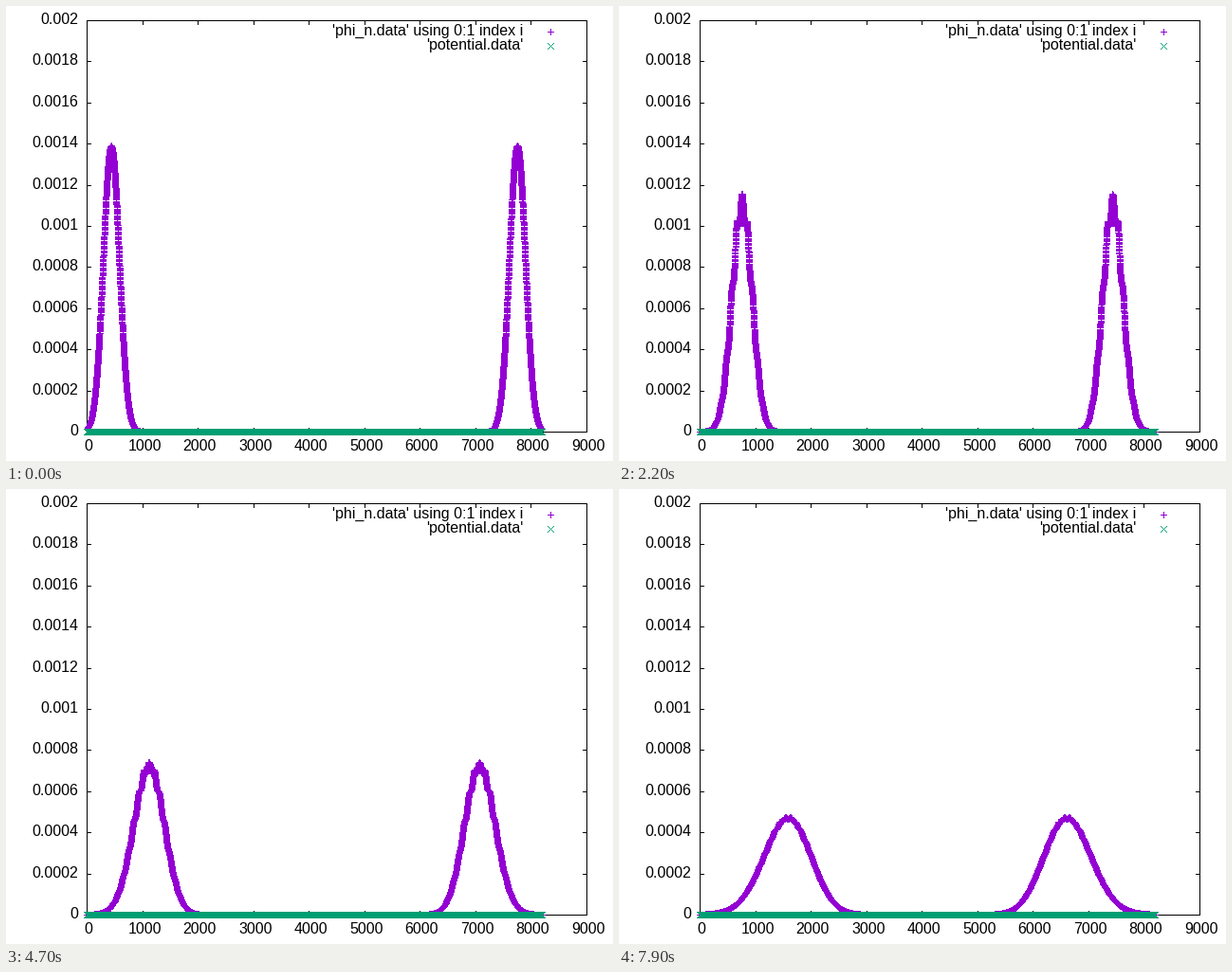
Animation of 640x480 px, one loop 8000 ms. Source, as a matplotlib script:

```python
import numpy as np
import matplotlib.pyplot as plt
from matplotlib.animation import FuncAnimation

W, H, DPI = 640, 480, 100
FRAMES, STEP = 80, 100
LEFT, RIGHT, TOP, BOTTOM = 85, 612, 15, 449
XMAX, YMAX, N = 9000, 0.002, 8192
PURPLE, GREEN = "#9400d3", "#009e73"
PX = 72 / DPI
ARM = 3

plt.rcParams["path.simplify"] = False
plt.rcParams["font.family"] = "Liberation Sans"

fig = plt.figure(figsize=(W / DPI, H / DPI), dpi=DPI, facecolor="white")
ax = fig.add_axes([0, 0, 1, 1])
ax.set(xlim=(0, W), ylim=(H, 0))
ax.axis("off")


def col(x):
    return np.rint(LEFT + np.asarray(x) * (RIGHT - LEFT) / XMAX)


def row(y):
    return np.rint(BOTTOM - np.asarray(y) * (BOTTOM - TOP) / YMAX)


def join(x0, y0, x1, y1):
    """Separate segments as one broken polyline."""
    gap = np.full(len(x0), np.nan)
    return (np.column_stack([x0, x1, gap]).ravel(),
            np.column_stack([y0, y1, gap]).ravel())


def pluses(c, r):
    return join(np.r_[c - ARM, c + 0.5], np.r_[r + 0.5, r - ARM],
                np.r_[c + ARM + 1, c + 0.5], np.r_[r + 0.5, r + ARM + 1])


def crosses(c, r):
    k = np.arange(-ARM, ARM + 1)
    x = np.add.outer(c, np.r_[k, k]).ravel()
    y = np.add.outer(r, np.r_[k, -k]).ravel()
    x, y = np.unique(np.column_stack([x, y]), axis=0).T
    return join(x, y + 0.5, x + 1, y + 0.5)


def stroke(xy, color, z):
    line, = ax.plot(*xy, color=color, lw=PX, antialiased=False, snap=False,
                    solid_capstyle="butt", zorder=z)
    return line


def label(x, y, s, ha):
    ax.text(x, y, s, ha=ha, va="baseline", fontsize=16 * PX, color="black")


def draw_frame():
    xs, ys = col(np.arange(0, XMAX + 1, 1000)), row(np.arange(11) * YMAX / 10)
    for y in (TOP, BOTTOM):
        stroke(([LEFT, RIGHT + 1], [y + 0.5] * 2), "black", 1)
    for x in (LEFT, RIGHT):
        stroke(([x + 0.5] * 2, [TOP, BOTTOM + 1]), "black", 1)
    for i, x in enumerate(xs):
        for y in (TOP, BOTTOM - 4):
            stroke(([x + 0.5] * 2, [y, y + 5]), "black", 1)
        label(x + 2, 469, str(i * 1000), "center")
    for i, y in enumerate(ys):
        for x in (LEFT, RIGHT - 4):
            stroke(([x, x + 5], [y + 0.5] * 2), "black", 1)
        label(76, y + 4, f"{i * 0.0002:.4g}", "right")


def packet(x, t):
    """Density of one spreading pulse that leaves the wall at x = 0."""
    d = x - 440 - 145 * t
    sigma = np.sqrt(143.5 ** 2 + 2540 * t ** 2)
    u = d / sigma
    u = u * (1 + 0.0025 * t * np.clip(u, -4, 4))
    base = 0.5 / (sigma * np.sqrt(2 * np.pi)) * np.exp(-u ** 2 / 2)
    early = np.exp(-2 * (t - 0.8) ** 2)
    s = t / 2.4
    amp = 0.045 * (s * np.exp(1 - s)) ** 2 + 0.006 * min(t, 1)
    amp = amp * (1 + 8 * early / (1 + np.exp(np.clip((d + 60) / 40, -30, 30))))
    phase = np.pi * max(0, t - 7) / 0.9
    return base * (1 + amp * np.cos(2 * np.pi * d / (95 + 50 * early) + phase))


x = np.arange(N + 1)
cols = col(x)


def curve(t):
    rows = row(packet(x, t) + packet(N - x, t))
    c, r = np.unique(np.column_stack([cols, rows]), axis=0).T
    return pluses(c, r)


draw_frame()
label(545, 31, "'phi_n.data' using 0:1 index i", "right")
label(545, 46, "'potential.data'", "right")
stroke(pluses(np.array([574]), np.array([27])), PURPLE, 2)
stroke(crosses(np.array([574]), np.array([42])), GREEN, 3)
wave = stroke(curve(0), PURPLE, 2)
flat = np.unique(cols)
stroke(crosses(flat, np.full(len(flat), BOTTOM)), GREEN, 3)


def update(i):
    wave.set_data(*curve(i * STEP / 1000))
    return wave,


anim = FuncAnimation(fig, update, frames=FRAMES, interval=STEP,
                     repeat=True, repeat_delay=0, blit=False)
plt.show()
```
